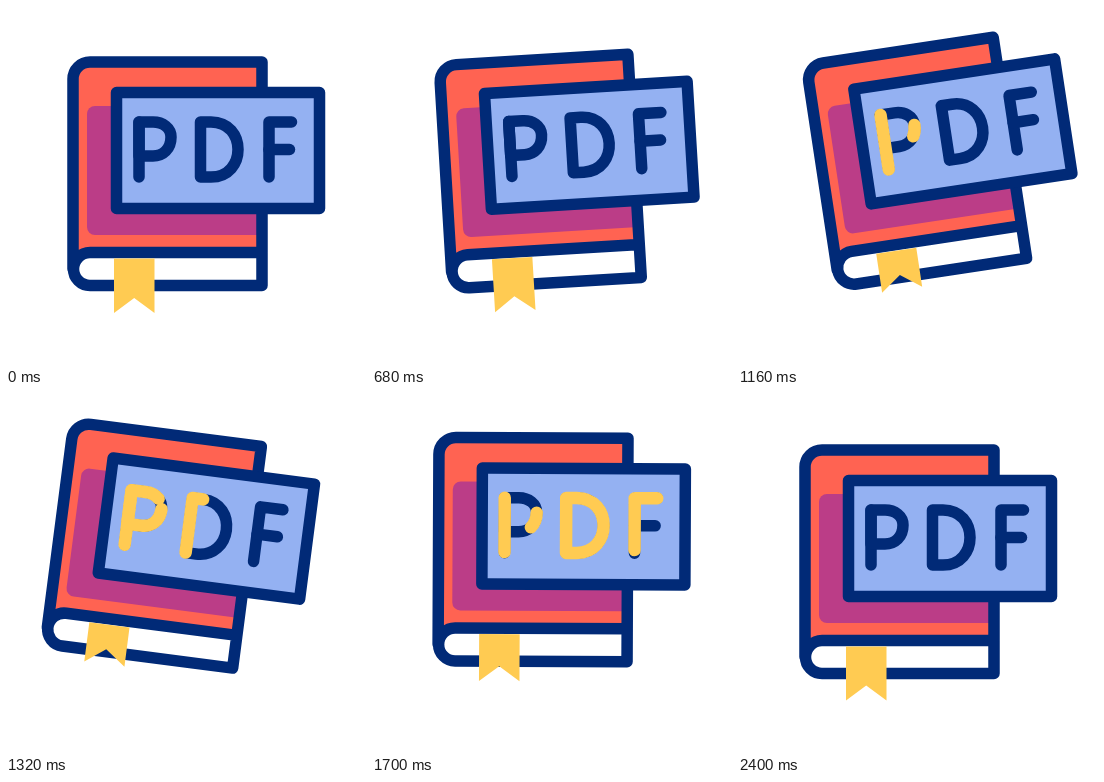
Write an HTML page that moves like this. It is 360 by 360 pixels and loops after 2800 ms.

```html
<!DOCTYPE html>
<html lang="en">
<head>
<meta charset="utf-8">
<title>PDF book</title>
<style>
  html, body { margin: 0; width: 100%; height: 100%; overflow: hidden; background: #fff; }
  svg { display: block; width: 100vw; height: 100vh; }
  .line { fill: none; stroke: #012a77; stroke-width: 11.5; stroke-linecap: round; stroke-linejoin: round; }
  .gold { stroke: #ffcb52; stroke-width: 12.5; }
</style>
</head>
<body>
<svg viewBox="0 0 360 360">
  <g id="book">
    <path fill="#fff" d="M84 246.5H256V279.5H84a16.5 16.5 0 0 1 0-33z"/>
    <path fill="#ff6352" d="M67 263V73a17 17 0 0 1 17-17H256V246.5H84a17 16.5 0 0 0-17 16.5z"/>
    <path fill="#bb3d87" d="M252 100H89a8 8 0 0 0-8 8V221a8 8 0 0 0 8 8H252z"/>
    <path class="line" d="M67 263V73a17 17 0 0 1 17-17H256V279.5H84a16.5 16.5 0 0 1 0-33H256"/>
    <path id="ribbon" fill="#ffcb52"/>
    <g id="jets"></g>
    <rect class="line" style="fill:#94b1f2" x="110.5" y="86.5" width="203" height="116"/>
    <g id="letters"></g>
  </g>
</svg>
<script>
const LOOP = 2800;
const $ = id => document.getElementById(id);

// Keyed values [time, value], eased with a half cosine between keys
const tracks = {
  tilt: [[520, 0], [1000, -13.6], [1045, -13.6], [1470, 15.3], [1920, -13.6], [2290, 0]],
  lift: [[520, 0], [1020, -13.6], [1920, -11.9], [2290, 0]],
  tip: [[100, 307], [460, 330], [480, 330], [820, 292], [1470, 292], [1920, 306.5]]
};

// Stroke path, draw-in start and end, wipe-out start and end
const strokes = [
  ['M133 116V171', 878, 1090, 1700, 1800],
  ['M165 131C165 143 157 150 147 150H133V116H147C157 116 165 122 165 131', 1142, 1340, 1580, 1720],
  ['M194.5 171V116H205C241 116 241 171 205 171H194.5', 1200, 1500, 1700, 1950],
  ['M285.5 116H263V171', 1485, 1710, 1950, 2180],
  ['M263 143.5H283.5', 1710, 1780, 1885, 1960]
];

// Exhaust streaks: x, start time, lowest point
const jets = [[92.5, 740, 337], [129, 740, 337], [161, 790, 330]];

function add(parent, d, cls) {
  const p = document.createElementNS('http://www.w3.org/2000/svg', 'path');
  p.setAttribute('class', cls);
  if (d) p.setAttribute('d', d);
  return parent.appendChild(p);
}

const clamp = (v, lo, hi) => Math.min(hi, Math.max(lo, v));
const ramp = (t, a, b) => clamp((t - a) / (b - a), 0, 1);

function value(keys, t) {
  const i = keys.findIndex(k => k[0] > t);
  if (i === 0) return keys[0][1];
  if (i < 0) return keys[keys.length - 1][1];
  const [t0, v0] = keys[i - 1], [t1, v1] = keys[i];
  return v0 + (v1 - v0) * (1 - Math.cos(Math.PI * ramp(t, t0, t1))) / 2;
}

strokes.forEach(s => add($('letters'), s[0], 'line'));
const inks = strokes.map(([d, ...times]) => {
  const el = add($('letters'), d, 'line gold');
  return { el, times, len: el.getTotalLength() };
});
const streaks = jets.map(([x, start, low]) => {
  const el = add($('jets'), '', 'line gold');
  el.style.strokeWidth = 11;
  return { el, x, start, low };
});

function draw(t) {
  const tilt = value(tracks.tilt, t), lift = value(tracks.lift, t), tip = value(tracks.tip, t);
  $('book').setAttribute('transform', `translate(0 ${lift}) rotate(${tilt} 181 56)`);
  $('ribbon').setAttribute('d', `M108 252.5H148.5V${tip}L128.2 ${tip - 15}L108 ${tip}z`);

  for (const { el, times: [a, b, c, d], len } of inks) {
    const shown = ramp(t, a, b) - ramp(t, c, d);
    el.style.display = shown > 0 ? '' : 'none';
    el.style.strokeDasharray = `${shown * len} ${len + 20}`;
  }

  for (const { el, x, start, low } of streaks) {
    const head = 291 + (t - start) * 0.267, tail = head - 24.5;
    el.style.display = t > start && tail < low ? '' : 'none';
    el.setAttribute('d', `M${x} ${clamp(tail, 291, low)}V${clamp(head, 291, low) + 0.01}`);
  }
}

const begin = performance.now();
function tick() {
  draw((performance.now() - begin) % LOOP);
  requestAnimationFrame(tick);
}
tick();
</script>
</body>
</html>
```
